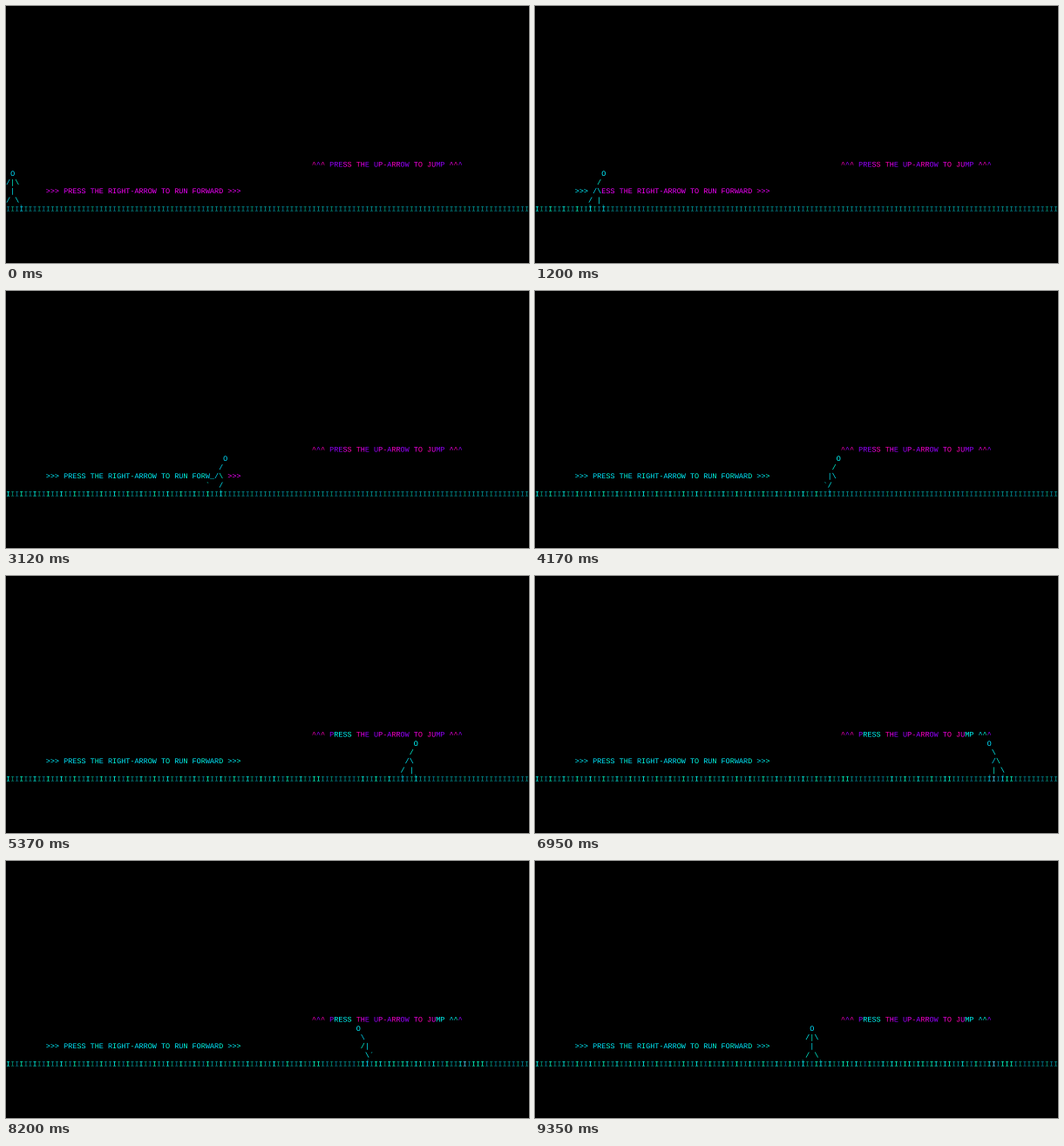
An HTML page with a canvas that plays this animation: 600 px wide and 295 px high, repeating every 9910 ms.

```html
<!DOCTYPE html>
<html lang="en">
<head>
<meta charset="utf-8">
<style>
  html, body { margin: 0; height: 100%; overflow: hidden; background: #000; }
  canvas { display: block; width: 600px; height: 295px; }
</style>
</head>
<body>
<canvas id="stage" width="1200" height="590"></canvas>
<script>
const ctx = document.getElementById('stage').getContext('2d');
ctx.scale(2, 2); // drawn at double size for smooth small glyphs
const LOOP = 9910, COLS = 118, CELL_W = 600 / COLS, CELL_H = 295 / 29;
const HEAD_BASELINE = 194.9, GROUND = 4;

const PALETTES = {
  ground: ['#009696', '#008296', '#00967d'],
  stepped: ['#00ffc8', '#00fff0', '#50dcff'],
  visited: ['#00ffff', '#00f0ff', '#00ffdc', '#00e1ff'],
  hintRun: ['#f000ff', '#ff00f0', '#dc00ff'],
  hintJump: ['#9600ff', '#f000f0', '#ff00b4', '#8200ff'],
};
const HINTS = [
  { row: -1, col: 69, text: '^^^ PRESS THE UP-ARROW TO JUMP ^^^', palette: 'hintJump' },
  { row: 2, col: 9, text: '>>> PRESS THE RIGHT-ARROW TO RUN FORWARD >>>', palette: 'hintRun' },
];

// Each part of a pose: [row below the head, column offset, characters]
const POSES = {
  idle: [[0, 0, 'O'], [1, -1, '/|\\'], [2, 0, '|'], [3, -1, '/ \\'], [4, -2, 'Ì   Ì']],
  run: [
    [[0, 1, 'O'], [1, 0, '/'], [2, -2, '_/\\'], [3, -3, '`  /'], [4, 0, 'Ì']],
    [[0, 1, 'O'], [1, 0, '/'], [2, -1, '|\\'], [3, -2, '`/'], [4, -1, 'Ì']],
    [[0, 1, 'O'], [1, 0, '/'], [2, -1, '/\\'], [3, -2, '/ |'], [4, -2, 'Ì  Ì']],
  ],
  crouch: [[1, 1, 'O'], [2, 0, '/'], [3, -1, '/>'], [4, -1, 'ÌÌ']],
  rise: [[0, 1, 'O'], [1, 0, '/'], [2, -1, '/\\'], [3, -2, '/ /']],
  fly: [[-1, -1, '\\O/'], [0, 0, '|'], [1, -1, '/\\'], [2, -2, '` /']],
  land: [[1, 1, 'O'], [2, 0, '/'], [3, -1, '/>'], [4, 0, 'Ì']],
};

const SWAP = { '/': '\\', '\\': '/', '`': '´', 'Ì': 'Í' };
const mirror = pose => pose.map(([row, dx, text]) =>
  [row, 1 - dx - text.length, [...text].reverse().map(c => SWAP[c] || c).join('')]);
const runLeft = POSES.run.map(mirror);

const steps = [];
const add = (time, pose, x) => steps.push({ time, pose, x });
// Strides one column per step; phase is the column residue of a planted foot.
function run(start, end, from, to, phase) {
  const dir = Math.sign(to - from), count = Math.abs(to - from);
  const poses = dir > 0 ? POSES.run : runLeft;
  for (let i = 0; i <= count; i++) {
    const x = from + dir * i, stride = (dir * (x - phase) + 300) % 3;
    const lead = i ? 0.2 : 0;
    add(start + (end - start) * (i - lead) / count, poses[stride], x);
  }
}

add(0, POSES.idle, 1);
run(510, 1480, 2, 19, 0);
run(1530, 2500, 20, 37, 0);
run(2550, 3530, 38, 55, 0);
run(3580, 4283, 56, 69, 0);
add(4340, POSES.crouch, 70);
add(4390, POSES.rise, 71);
add(4450, POSES.rise, 73);
add(4500, POSES.fly, 75);
add(4630, POSES.fly, 77);
add(4710, POSES.land, 80);
run(4770, 5370, 81, 91, 2);
add(5420, POSES.run[0], 92);
add(5480, POSES.crouch, 93);
add(5540, POSES.rise, 95);
add(5600, POSES.fly, 98);
add(5700, POSES.fly, 100);
add(5800, POSES.land, 103);
run(5980, 6030, 104, 105, 1);
add(6080, POSES.idle, 105);
run(6950, 7920, 103, 85, 0);
run(7970, 8940, 84, 67, 0);
run(9000, 9250, 66, 61, 0);
add(9350, POSES.idle, 62);

function eachCell({ pose, x }, visit) {
  for (const [row, dx, text] of pose) {
    [...text].forEach((char, i) => { if (char !== ' ') visit(row, x + dx + i, char); });
  }
}

function put(row, col, char, palette) {
  const colors = PALETTES[palette];
  const pick = (col * 7 + row * 3 + (col * col >> 2) + 100) % colors.length;
  ctx.fillStyle = colors[pick];
  ctx.fillText(char, col * CELL_W, HEAD_BASELINE + row * CELL_H);
}

function draw(time) {
  const past = steps.filter(step => step.time <= time + 0.5);
  const current = past[past.length - 1];
  const visited = new Set(), covered = new Set();
  const key = (row, col) => row * 1000 + col;
  past.forEach(step => eachCell(step, (row, col) => visited.add(key(row, col))));
  eachCell(current, (row, col) => covered.add(key(row, col)));

  ctx.fillStyle = '#000';
  ctx.fillRect(0, 0, 600, 295);
  ctx.font = '8.47px "Liberation Mono", monospace';
  ctx.textRendering = 'geometricPrecision';

  const scenery = (row, col, char, fresh, touched) => {
    const cell = key(row, col);
    if (!covered.has(cell)) put(row, col, char, visited.has(cell) ? touched : fresh);
  };
  for (let col = 0; col < COLS; col++) scenery(GROUND, col, 'I', 'ground', 'stepped');
  for (const { row, col, text, palette } of HINTS) {
    [...text].forEach((char, i) => scenery(row, col + i, char, palette, 'visited'));
  }
  eachCell(current, (row, col, char) => put(row, col, char, 'visited'));
}

const origin = performance.now();
function tick() {
  draw((performance.now() - origin) % LOOP);
  requestAnimationFrame(tick);
}
tick();
</script>
</body>
</html>
```
